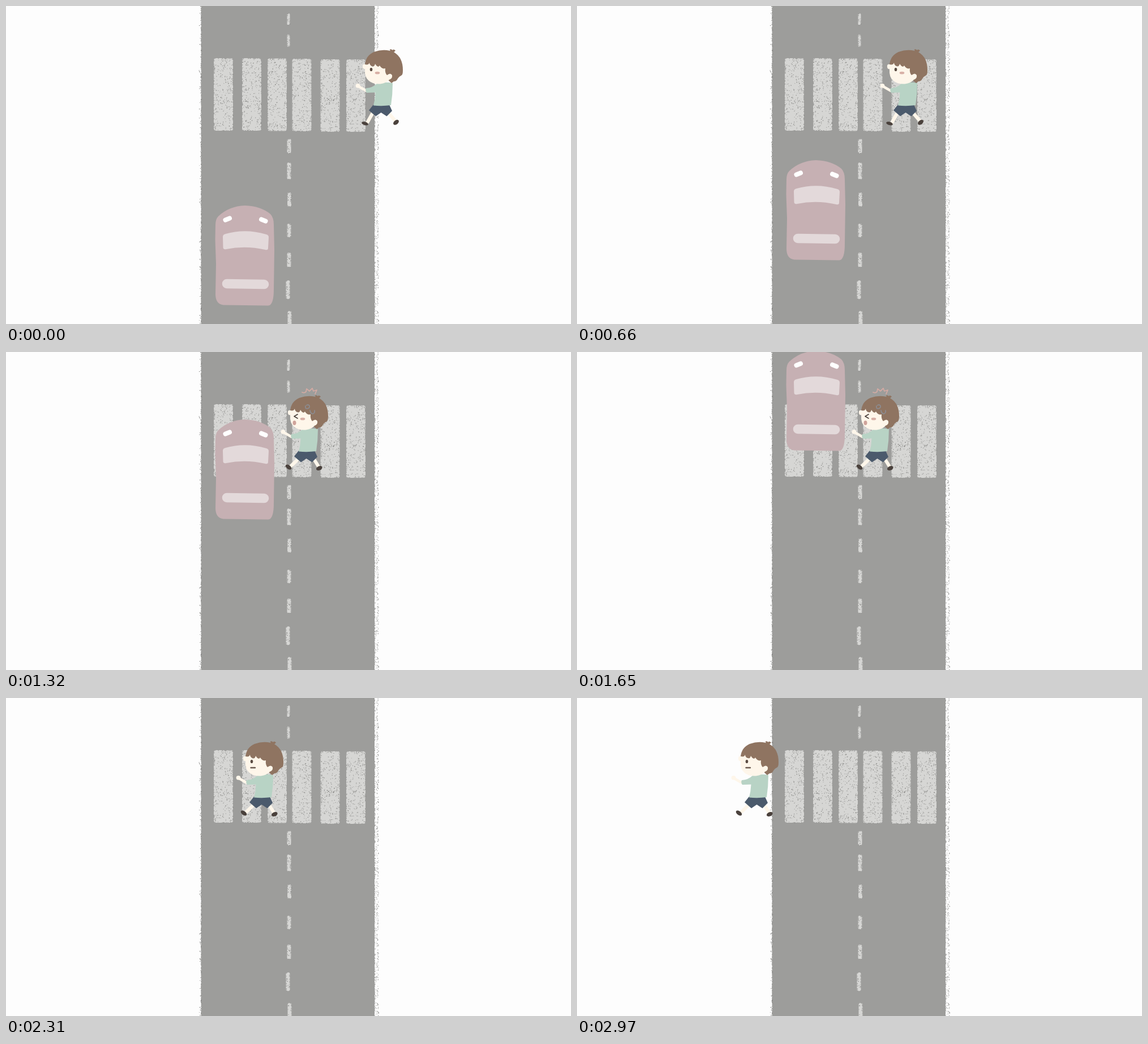
Animation of 998 by 561 pixels, one loop 3.3 s. Source, as an HTML page with a canvas:

```html
<!DOCTYPE html>
<html lang="en">
<head>
<meta charset="utf-8">
<title>Crossing</title>
<style>
html, body { margin: 0; width: 100%; height: 100%; overflow: hidden; background: #fdfdfd; }
canvas { display: block; }
</style>
</head>
<body>
<canvas id="stage" width="998" height="561"></canvas>
<script>
const STEP = 330;
const ROAD = '#9d9d9b', PAINT = '#d6d6d4', SKIN = '#fef6ea', HAIR = '#8f7461', DARK = '#4a413c', PINK = '#d8b0a6';

// One entry per step: car top, boy shift, stride (0/1), face
const steps = [
  [352, 0, 0, 'calm'], [298, -31, 1, 'calm'], [272, -82, 0, 'calm'],
  [194, -132, 1, 'shock'], [119, -132, 1, 'shock'], [-2, -132, 1, 'shock'], [-105, -132, 1, 'shock'],
  [-300, -211, 1, 'flat'], [-300, -268, 0, 'flat'], [-300, -345, 1, 'flat']
];

const stage = document.getElementById('stage').getContext('2d');
const back = document.createElement('canvas');
back.width = 998;
back.height = 561;
let g = back.getContext('2d');

let seed = 7;
function rnd() {
  seed = (seed * 16807) % 2147483647;
  return seed / 2147483647;
}

function fill(d, color) {
  g.fillStyle = color;
  g.fill(new Path2D(d));
}

function line(d, color, width) {
  g.strokeStyle = color;
  g.lineWidth = width;
  g.lineCap = g.lineJoin = 'round';
  g.stroke(new Path2D(d));
}

function oval(x, y, rx, ry, color, deg = 0) {
  g.fillStyle = color;
  g.beginPath();
  g.ellipse(x, y, rx, ry, deg * Math.PI / 180, 0, 7);
  g.fill();
}

function speck(x, y, color) {
  g.fillStyle = color;
  g.fillRect(x, y, 0.7 + rnd() * 0.9, 0.7 + rnd() * 0.9);
}

function chalk(x, y, w, h, r, density) {
  g.fillStyle = PAINT;
  g.beginPath();
  g.roundRect(x, y, w, h, r);
  g.fill();
  for (let i = w * h * density; i > 0; i--) {
    speck(x + rnd() * w, y + rnd() * h, rnd() < 0.2 ? '#80807e' : ROAD);
  }
  for (let i = (w + h) * 0.7; i > 0; i--) {
    const side = rnd() < 0.5;
    if (rnd() * (w + h) < h) speck(side ? x : x + w - 1, y + rnd() * h, ROAD);
    else speck(x + rnd() * w, side ? y : y + h - 1, ROAD);
  }
}

function drawRoad() {
  g.fillStyle = '#fdfdfd';
  g.fillRect(0, 0, 998, 561);
  g.fillStyle = ROAD;
  g.fillRect(345, 0, 306, 561);
  for (let y = 0; y < 561; y++) {
    speck(344 + rnd(), y, ROAD);
    if (rnd() < 0.35) speck(345 - rnd() * rnd() * 5, y, '#858583');
    if (rnd() < 0.5) speck(650 + rnd() * 1.5, y, ROAD);
    if (rnd() < 0.25) speck(652 + rnd() * 3, y, '#b4b4b2');
    if (rnd() < 0.4) speck(654.5 + rnd() * 3, y, '#959593');
  }
  [[367, 92], [417, 92], [462, 92.5], [505.5, 93], [555.5, 94], [601, 94]]
    .forEach(([x, y]) => chalk(x, y, 34, 128, 4, 0.06));
  [[499, 13, 21], [499, 50, 22], [500, 234, 26], [500, 276, 30], [500.5, 329, 25],
   [500, 384, 24], [500, 435, 26], [498, 484, 33], [501, 538, 28]]
    .forEach(([x, y, h]) => chalk(x - (y < 99 ? 2.5 : 3.5), y, y < 99 ? 5 : 7, h, 3, 0.06));
}

function drawCar(top) {
  g.save();
  g.translate(0, top - 352);
  fill('M370 386Q370 376 375 371Q394 353 422 352Q450 353 467 367Q473 373 473 386L474 430L473 500Q473 528 463 528.5L384 527.5Q370 526 370 508L371 455L369.5 412Z', '#c6b0b3');
  fill('M383 407Q383 403 388 402Q423 392 460 403Q464 404 464 408L463 427Q463 431 458 430Q423 422 389 429Q384 430 383.5 426Z', '#e3d9da');
  line('M390 490L456 491', '#e3d9da', 16.5);
  line('M387.5 377.5L395 374.5', '#fff', 8);
  line('M451 376.5L458.5 379.5', '#fff', 8);
  g.restore();
}

function drawFace(mood) {
  if (mood === 'shock') {
    line('M647 110L641 113.5L647 117', DARK, 1.7);
    oval(641.5, 125, 3, 4, '#cfa39b');
    line('M661 95Q660 100 664 100Q669 99 668 95Q666 92 663 94', '#8c8d93', 1.7);
    line('M669 103Q670 109 674 109Q678 108 677 103', '#8c8d93', 1.7);
    line('M655 71Q659 73 662 70L663 65L668 69L673 64L675 69L681 67L678 74', '#d3aaa3', 1.8);
  } else {
    oval(645, 112, 2.3, 3.1, '#5a4b42');
  }
  if (mood === 'flat') line('M643.5 123H651', '#6b5a50', 2.4);
  else oval(656, 118, 4.3, 2.3, PINK);
}

function drawBoy(shift, stride, mood) {
  g.save();
  g.translate(shift, 0);

  // Legs and shoes
  if (stride) {
    line('M648 189L635.5 201', SKIN, 6);
    line('M676 189L684 202', SKIN, 6);
    oval(631, 203, 6, 3.4, DARK, 36);
    oval(685.3, 205, 5.6, 3.6, DARK, -25);
  } else {
    line('M647 190L638.5 205', SKIN, 6);
    line('M676 189L687 202', SKIN, 6);
    oval(634, 207.3, 6, 2.9, DARK, 16);
    oval(689, 205.3, 5.6, 3.6, DARK, -38);
  }
  fill('M649 174H677L682 185L672.5 194.5L662.5 188L653 194.5L641 184Z', '#4b5a6c');

  // Arm and shirt
  line('M623 142L636 149.5', SKIN, 4.6);
  oval(621.5, 140.8, 3.9, 3.7, SKIN);
  fill('M655 137Q669 133 683 136Q683 156 680 175Q665 177 649 175.5Q652 165 652.5 152.5L637 153Q634 149 636 145Q648 144 655 137Z', '#b8d3c5');

  // Head
  fill('M634 103Q636 87 650 81Q670 74 686 82Q701 91 701 113Q701 121 699 122Q695 124 692 128Q690 133 685 133L681 136L672 128L655 108Z', HAIR);
  fill('M677 81Q680 79 677.5 77Q680 75 683 78Q684 75.5 688 78.5L683 84Z', HAIR);
  fill('M634.5 103Q629 102 630 108Q631 112 634 111Q633 126 641 132Q648 138 661 137.5Q672 136 677 130Q683 128 682 122Q679 117 673 122Q669 118 670 110Q664 112 660 105Q657 110 652 102Q651 107 647 107Q642 104 642 100Q640 105 634.5 103Z', SKIN);
  drawFace(mood);
  g.restore();
}

drawRoad();
g = stage;

function frame(now) {
  const [carTop, shift, stride, mood] = steps[Math.floor(now / STEP) % steps.length];
  g.drawImage(back, 0, 0);
  drawBoy(shift, stride, mood);
  drawCar(carTop);
  requestAnimationFrame(() => frame(performance.now()));
}
frame(performance.now());
</script>
</body>
</html>
```
